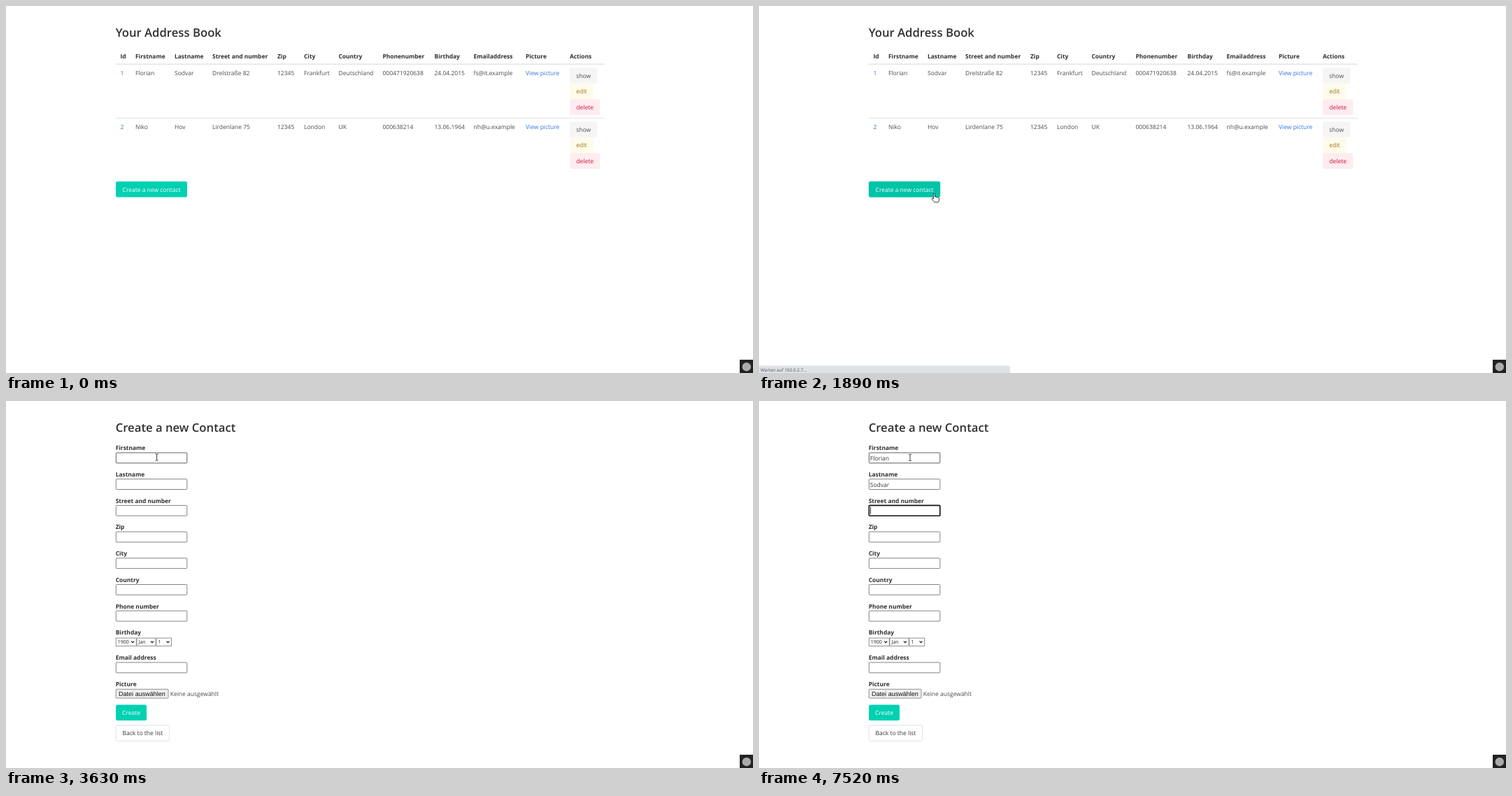
Write an HTML page that moves like this. It is 1068 px wide and 525 px high and loops after 8 s.

```html
<!DOCTYPE html>
<html lang="en">
<head>
<meta charset="utf-8">
<title>Address book</title>
<style>
html, body { margin: 0; width: 100%; height: 100%; overflow: hidden; background: #fff; }
svg { display: block; width: 100vw; height: 100vh; }
text { font: 8.5px "Open Sans", "Noto Sans", sans-serif; fill: #4a4a4a; text-rendering: geometricPrecision; white-space: pre; }
.bold { font-weight: 700; font-size: 8.42px; fill: #2f2f2f; }
.title { font-weight: 600; font-size: 16.7px; fill: #303030; }
.link { fill: #3273dc; }
.mid { text-anchor: middle; }
.white { fill: #fff; }
.small { font-size: 7px; fill: #222; }
.file { font: 9.05px "Liberation Sans", Arial, sans-serif; fill: #111; }
.hint { font-size: 6.3px; fill: #4f5357; }
.typed { fill: #363636; }
</style>
</head>
<body>
<svg id="stage" viewBox="0 0 1068 525" xmlns="http://www.w3.org/2000/svg"></svg>
<script>
const LOOP = 8000, PAGE_SWAP = 2870;

const text = (x, y, s, cls = '', id = '') => `<text x="${x}" y="${y}" class="${cls}" id="${id}">${s}</text>`;
const box = (x, y, w, h, attrs) => `<rect x="${x}" y="${y}" width="${w}" height="${h}" ${attrs}/>`;
const button = (x, y, w, label, bg, color, extra = '') =>
  box(x, y, w, 22.5, `rx="2.25" fill="${bg}" ${extra}`) +
  `<text x="${x + w / 2}" y="${y + 14.5}" class="mid" style="fill:${color}">${label}</text>`;

// List page
const cols = [163.5, 185, 241, 295, 388, 426, 475.5, 538.5, 612.5, 668.5, 743, 806];
const heads = ['Id', 'Firstname', 'Lastname', 'Street and number', 'Zip', 'City', 'Country',
  'Phonenumber', 'Birthday', 'Emailaddress', 'Picture', 'Actions'];
const rows = [
  ['1', 'Florian', 'Sodvar', 'Drelstraße 82', '12345', 'Frankfurt', 'Deutschland',
    '000471920638', '24.04.2015', 'fs@it.example', 'View picture'],
  ['2', 'Niko', 'Hov', 'Lirdenlane 75', '12345', 'London', 'UK',
    '000638214', '13.06.1964', 'nh@u.example', 'View picture']
];

const tableRow = (row, i) => {
  const y = 77 * i;
  return row.map((s, c) => text(cols[c], 98.7 + y, s, c === 0 || c === 10 ? 'link' : '')).join('') +
    button(806, 88.3 + y, 39.3, 'show', '#f5f5f5', '#4d4d4d') +
    button(806, 110.9 + y, 33.8, 'edit', '#fffbeb', '#947600') +
    button(806, 133.5 + y, 43.3, 'delete', '#feecf0', '#cc0f35');
};

const listPage = text(156.7, 43.7, 'Your Address Book', 'title') +
  heads.map((s, i) => text(cols[i], 74.9, s, 'bold')).join('') +
  box(157, 82.6, 699, 1.1, 'fill="#dbdbdb"') +
  box(157, 160.2, 699, 0.8, 'fill="#dbdbdb"') +
  rows.map(tableRow).join('') +
  box(156.4, 250.4, 103.2, 23.7, 'id="ring" rx="3" fill="#00d1b2" fill-opacity=".3"') +
  button(157, 251, 102, 'Create a new contact', '#00d1b2', '#fff', 'id="create"');

// Form page
const PITCH = 37.7;
const labels = ['Firstname', 'Lastname', 'Street and number', 'Zip', 'City', 'Country', 'Phone number'];
const fieldTops = [...labels.map((_, i) => 73.6 + PITCH * i), 373.6];
const field = (y, i) => box(157.3, y + 0.4, 101.5, 14.8, `id="field${i}" rx="1" fill="#fff"`);
const select = (x, w, s) =>
  box(x, 339.1, w, 11.3, 'fill="#fff" stroke="#767676" stroke-width=".8"') +
  text(x + 2.6, 347.4, s, 'small') +
  `<path d="M${x + w - 7} 343.6l2 2 2-2" fill="none" stroke="#111" stroke-width="1.2"/>`;

const formPage = text(156.7, 43.7, 'Create a new Contact', 'title') +
  labels.map((s, i) => text(156.7, 70.3 + PITCH * i, s, 'bold')).join('') +
  text(156.7, 334.2, 'Birthday', 'bold') +
  text(156.7, 370.2, 'Email address', 'bold') +
  text(156.7, 408, 'Picture', 'bold') +
  fieldTops.map(field).join('') +
  select(157.2, 29, '1900') + select(187, 27, 'Jan') + select(215, 21.5, '1') +
  box(157.2, 412.3, 74.8, 12.8, 'rx="1" fill="#efefef" stroke="#767676" stroke-width=".8"') +
  text(161, 421.9, 'Datei auswählen', 'file') + text(234.7, 421.9, 'Keine ausgewählt') +
  button(157, 434.5, 44, 'Create', '#00d1b2', '#fff') +
  button(157.2, 463.8, 76.5, 'Back to the list', '#fff', '#363636', 'stroke="#dbdbdb" stroke-width=".8"') +
  text(158.8, 84.8, '', 'typed', 'first') + text(158.8, 84.8 + PITCH, '', 'typed', 'last') +
  box(159, 0, 0.8, 10.5, 'id="caret" fill="#000"');

const cursors = `<g id="cursor" stroke="#111" stroke-width=".8" stroke-linejoin="round" fill="#fff">
  <path id="arrow" d="M0 0V9.6L2.2 7.6 3.7 11 5.1 10.4 3.6 7.1H6.7Z"/>
  <path id="hand" d="M-1 8V1a1 1 0 0 1 2 0V5q2-.6 2.2.5 2-.3 2.2.6 1.6-.2 1.6 1V9q0 2-1.2 3.7H.2Q-1.5 10.5-3.3 8.3q-.4-1.5 1-1.4z"/>
  <path id="beam" fill="none" d="M-2-4.5Q0-4.5 0-3.5Q0-4.5 2-4.5M0-3.5V4M-2 5Q0 5 0 4Q0 5 2 5"/></g>`;

const stage = document.getElementById('stage');
stage.innerHTML = `<g id="list">${listPage}</g><g id="form">${formPage}</g>
  <g id="toolbar">${box(1049, 506, 19, 19, 'fill="#222"')}<circle cx="1058.8" cy="516.2" r="6.2" fill="#aaa"/></g>
  <g id="status"><path d="M0 514.5H356.5q2.2 0 2.2 2.2V525H0z" fill="#dee1e6"/>${text(2.3, 523, 'Warten auf 192.0.2.7...', 'hint')}</g>${cursors}`;

const el = {};
stage.querySelectorAll('[id]').forEach(n => { if (n.id) el[n.id] = n; });
const show = (node, on) => node.setAttribute('visibility', on ? 'visible' : 'hidden');

// Pointer track: time, x, y
const track = [
  [210, 1003, 520], [400, 805, 468], [600, 636, 424], [800, 491, 379], [1000, 381, 340],
  [1230, 302, 300], [1470, 258.5, 270], [1850, 250.5, 268], [2050, 250.5, 268], [2220, 252.5, 260.5],
  [2690, 252.5, 260.5], [2730, 252.5, 259.5], [3020, 252.5, 259.5], [3190, 233, 136],
  [3450, 213, 77], [3660, 216, 80.8]
];
function pointer(t) {
  const i = track.findIndex(k => k[0] > t);
  if (i === 0) return track[0].slice(1);
  if (i < 0) return track[track.length - 1].slice(1);
  const [t0, x0, y0] = track[i - 1], [t1, x1, y1] = track[i];
  const u = (t - t0) / (t1 - t0);
  return [x0 + (x1 - x0) * u, y0 + (y1 - y0) * u];
}
const hitField = ([x, y]) => x > 157 && x < 259 ? fieldTops.findIndex(f => y >= f && y <= f + 15.6) : -1;

const keysFirst = [4630, 4830, 4960, 5110, 5240, 5420, 5600];
const keysLast = [6210, 6410, 6500, 6620, 7000, 7090];
const typed = (s, keys, t) => s.slice(0, keys.filter(k => t >= k).length);
const focusTimes = [3660, 5850, 7520];
const carets = [[3660, 4170], [4630, 6100], [6210, 7400], [7520, 8000]];

function statusOpacity(t) {
  if (t < 1850) return 0;
  if (t < 1890) return 0.15;
  return Math.max(0, Math.min(1, (3290 - t) / 200));
}

function render(t) {
  const onForm = t >= PAGE_SWAP;
  show(el.list, !onForm);
  el.form.style.display = onForm ? '' : 'none';
  show(el.toolbar, t < PAGE_SWAP || t >= 3060);
  el.status.setAttribute('opacity', statusOpacity(t));

  show(el.ring, !onForm && t >= 1890);
  el.create.setAttribute('fill', t >= 1520 ? '#00c4a7' : '#00d1b2');

  const p = pointer(t), [x, y] = p;
  const overButton = !onForm && x > 157 && x < 259 && y > 251 && y < 273.5;
  const kind = overButton ? 'hand' : onForm && hitField(p) >= 0 ? 'beam' : 'arrow';
  el.cursor.setAttribute('transform', `translate(${x} ${y})`);
  ['arrow', 'hand', 'beam'].forEach(k => show(el[k], t >= 210 && k === kind));

  if (!onForm) return;
  const focus = focusTimes.filter(f => t >= f).length - 1;
  const hover = hitField(pointer(t - 35));
  fieldTops.forEach((_, i) => {
    const f = el['field' + i];
    f.setAttribute('stroke', i === focus ? '#101010' : i === hover ? '#4f4f4f' : '#767676');
    f.setAttribute('stroke-width', i === focus ? 1.6 : 0.9);
  });
  el.first.textContent = typed(rows[0][1], keysFirst, t);
  el.last.textContent = typed(rows[0][2], keysLast, t);

  const active = [el.first, el.last][focus];
  const width = active && active.textContent ? active.getComputedTextLength() : 0;
  el.caret.setAttribute('x', 159 + width);
  el.caret.setAttribute('y', 76 + PITCH * Math.max(0, focus));
  el.caret.setAttribute('opacity', carets.some(([a, b]) => t >= a && t < b) ? 1 : 0);
}

const start = performance.now();
function tick() {
  render((performance.now() - start) % LOOP);
  requestAnimationFrame(tick);
}
tick();
</script>
</body>
</html>
```
